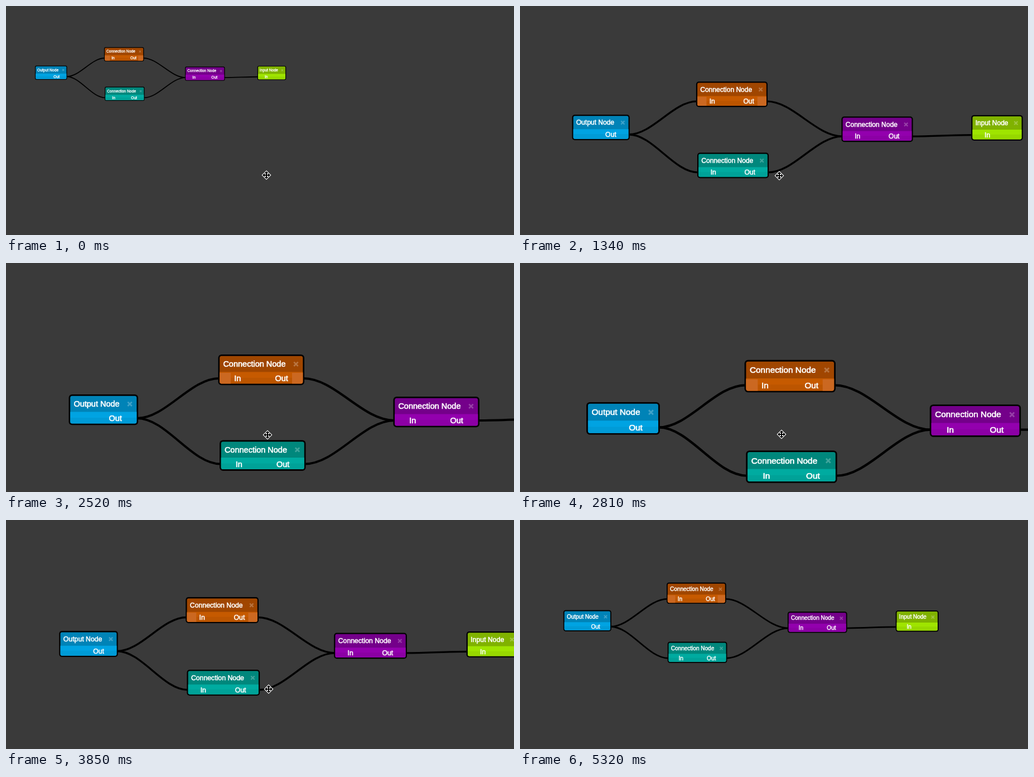
Recreate the animation shown at these times as an HTML page with a canvas. Size 911 by 413 pixels, loop 5920 ms.

```html
<!DOCTYPE html>
<html lang="en">
<head>
<meta charset="utf-8">
<title>Node graph zoom</title>
<style>
html, body { margin: 0; height: 100%; overflow: hidden; background: #3a3a3a; }
canvas { display: block; }
</style>
</head>
<body>
<canvas id="stage" width="911" height="413"></canvas>
<script>
const ctx = document.getElementById('stage').getContext('2d');
const TICK = 148, TICKS = 40;  // the picture advances in equal ticks
const H = 55.3, PORT = 43;

const OUTPUT = { title: 'Output Node', w: 124.5, out: true };
const CONNECTION = { title: 'Connection Node', w: 154.5, in: true, out: true };
const INPUT = { title: 'Input Node', w: 111.5, in: true };

const nodes = [
  { ...OUTPUT, x: 112.5, y: 237, head: '#0083b7', body: '#00a3e2' },
  { ...CONNECTION, x: 380.5, y: 165, head: '#a04600', body: '#c65a00', side: '#cb6821' },
  { ...CONNECTION, x: 383, y: 319.5, head: '#00877c', body: '#00aba0' },
  { ...CONNECTION, x: 694.5, y: 241, head: '#74008a', body: '#9300ae' },
  { ...INPUT, x: 975, y: 238, head: '#80b200', body: '#9fe400' }
];
const links = [[0, 1], [0, 2], [1, 3], [2, 3], [3, 4]];

// Key points: tick, value(s)
const zoomKeys = [
  [1, .4623], [2, .594], [6, .695], [9, .83], [10, .83], [15, .913], [16, .913],
  [17, 1], [19, 1.058], [20, 1.058], [23, 1.0057], [28, .741], [29, .691]
];
const pointerKeys = [[0, 467, 305], [9, 465, 306], [17, 469, 310], [28, 471, 304], [31, 471, 304], [35, 900, 397]];
const POINTER_GONE = 36;

function interpolate(keys, tick) {
  const next = keys.findIndex(key => key[0] > tick);
  if (next < 1) return keys.at(next).slice(1);
  const a = keys[next - 1], b = keys[next];
  const p = (tick - a[0]) / (b[0] - a[0]);
  return a.map((v, i) => v + (b[i] - v) * p).slice(1);
}

function rect(color, x, y, w, h) {
  ctx.fillStyle = color;
  ctx.fillRect(x, y, w, h);
}

function label(text, x, y, align = 'left') {
  ctx.textAlign = align;
  ctx.fillStyle = ctx.strokeStyle = '#fff';
  ctx.lineWidth = .65;
  ctx.fillText(text, x, y);
  ctx.strokeText(text, x, y);
}

function drawLink([from, to]) {
  const a = nodes[from], b = nodes[to];
  const x1 = a.x + a.w - 2, y1 = a.y + PORT, x2 = b.x + 2, y2 = b.y + PORT;
  const bend = (x2 - x1) * .35;
  ctx.beginPath();
  ctx.moveTo(x1, y1);
  ctx.bezierCurveTo(x1 + bend, y1, x2 - bend, y2, x2, y2);
  ctx.strokeStyle = '#000';
  ctx.lineWidth = 4;
  ctx.stroke();
}

function drawNode(n) {
  const { w } = n;
  ctx.save();
  ctx.translate(n.x, n.y);
  ctx.fillStyle = '#000';
  ctx.beginPath();
  ctx.roundRect(0, 0, w, H, 6);
  ctx.fill();

  ctx.save();
  ctx.beginPath();
  ctx.roundRect(2.7, 2.7, w - 5.4, H - 5.4, 3.5);
  ctx.clip();
  rect(n.head, 0, 0, w, H);
  rect(n.body, 0, 31.5, w, H);
  rect('rgba(0,0,0,.05)', 0, 42, w, H);
  if (n.side) {
    rect(n.side, 0, 33, 22.5, H);
    rect(n.side, w - 22, 33, 22, H);
  }
  ctx.restore();

  label(n.title, 8.9, 22);
  if (n.in) label('In', 28.7, 48);
  if (n.out) label('Out', w - 29.2, 48, 'right');

  const cx = w - 15, cy = 17.3, r = 3.7;
  ctx.beginPath();
  ctx.moveTo(cx - r, cy - r);
  ctx.lineTo(cx + r, cy + r);
  ctx.moveTo(cx + r, cy - r);
  ctx.lineTo(cx - r, cy + r);
  ctx.strokeStyle = 'rgba(255,255,255,.25)';
  ctx.lineWidth = 2.7;
  ctx.stroke();
  ctx.restore();
}

function polygon(color, ...points) {
  ctx.fillStyle = color;
  ctx.beginPath();
  points.forEach(([x, y]) => ctx.lineTo(x, y));
  ctx.fill();
}

function drawPointer(x, y) {
  ctx.setTransform(1, 0, 0, 1, Math.round(x), Math.round(y));
  polygon('#fff', [0, -8.5], [8.5, 0], [0, 8.5], [-8.5, 0]);
  for (let i = 0; i < 4; i++) {
    polygon('#000', [0, -7], [3.6, -3.3], [-3.6, -3.3]);
    rect('#000', -1, -4, 2, 4);
    ctx.rotate(Math.PI / 2);
  }
}

function draw(time) {
  // a small lead absorbs the rounding of tick times
  const tick = Math.floor((time + 8) / TICK) % TICKS;
  const [zoom] = interpolate(zoomKeys, tick);
  ctx.setTransform(1, 0, 0, 1, 0, 0);
  rect('#3a3a3a', 0, 0, 911, 413);
  ctx.setTransform(zoom, 0, 0, zoom, 0, 4 * zoom - 4);
  ctx.font = '14.5px "Liberation Sans", Arial, sans-serif';
  links.forEach(drawLink);
  nodes.forEach(drawNode);
  if (tick < POINTER_GONE) drawPointer(...interpolate(pointerKeys, tick));
}

const start = performance.now();
function animate() {
  draw(performance.now() - start);
  requestAnimationFrame(animate);
}
animate();
</script>
</body>
</html>
```
